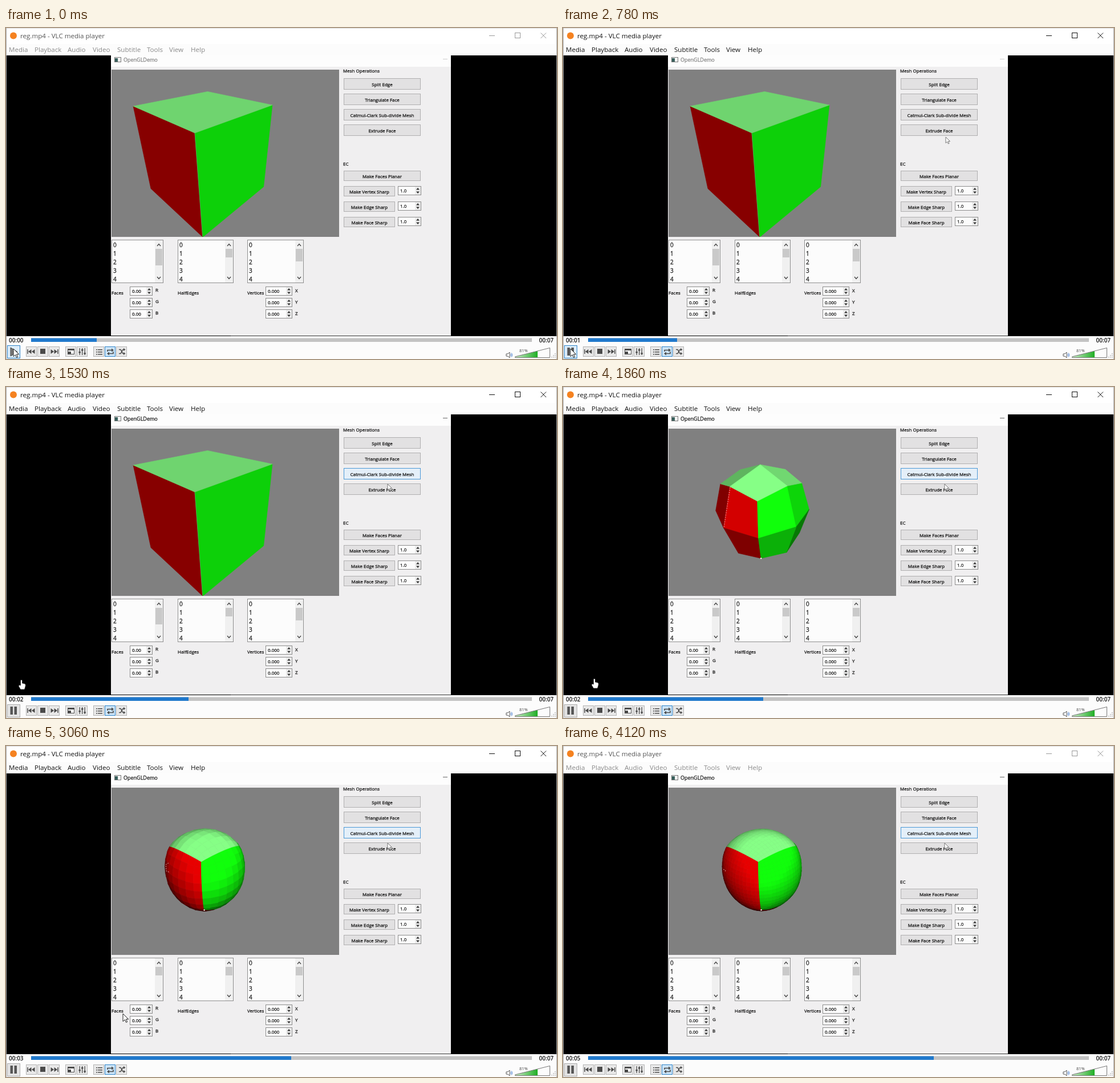
Write an HTML page with a canvas that moves like this. It is 966 by 580 pixels and loops after 4.27 s.

```html
<!DOCTYPE html>
<html lang="en">
<head>
<meta charset="utf-8">
<title>reg.mp4 - VLC media player</title>
<style>
html, body { margin: 0; width: 100%; height: 100%; overflow: hidden; background: #fff; }
canvas { display: block; width: 966px; height: 580px; }
</style>
</head>
<body>
<canvas id="stage" width="966" height="580"></canvas>
<script>
const ctx = document.getElementById('stage').getContext('2d');
const LOOP = 4270;
const SPLITS = [1680, 2280, 2970, 3730];

// ---- drawing helpers ----
function rect(x, y, w, h, fill) {
  ctx.fillStyle = fill;
  ctx.fillRect(x, y, w, h);
}

function box(x, y, w, h, fill, border) {
  rect(x, y, w, h, border);
  rect(x + 1, y + 1, w - 2, h - 2, fill);
}

function text(str, x, y, size, color = '#222', align = 'left', weight = 400) {
  ctx.font = `${weight} ${size}px "Open Sans", "Noto Sans", sans-serif`;
  ctx.textAlign = align;
  ctx.fillStyle = color;
  ctx.fillText(str, x, y);
}

// Text inside the video, slightly thickened.
function label(str, x, y, size = 8, color = '#222', align = 'left') {
  text(str, x, y, size, color, align);
  ctx.strokeStyle = color;
  ctx.lineWidth = 0.3;
  ctx.strokeText(str, x, y);
}

function trace(points, close) {
  ctx.beginPath();
  points.forEach(([x, y]) => ctx.lineTo(x, y));
  if (close) ctx.closePath();
}

function line(points, color, width = 1) {
  trace(points);
  ctx.strokeStyle = color;
  ctx.lineWidth = width;
  ctx.stroke();
}

function poly(points, fill, border, width = 1) {
  trace(points, true);
  ctx.fillStyle = fill;
  ctx.fill();
  if (!border) return;
  ctx.strokeStyle = border;
  ctx.lineWidth = width;
  ctx.stroke();
}

function disc(x, y, r, fill) {
  ctx.beginPath();
  ctx.arc(x, y, r, 0, 7);
  ctx.fillStyle = fill;
  ctx.fill();
}

// Position on a path of [time, x, y] keys.
function along(keys, t) {
  const i = keys.findIndex(k => k[0] > t);
  if (i < 0) return keys[keys.length - 1].slice(1);
  if (i === 0) return keys[0].slice(1);
  const [t0, x0, y0] = keys[i - 1], [t1, x1, y1] = keys[i];
  const u = (t - t0) / (t1 - t0), s = u * u * (3 - 2 * u);
  return [x0 + (x1 - x0) * s, y0 + (y1 - y0) * s];
}

// ---- mesh ----
const mean = pts => [0, 1, 2].map(i => pts.reduce((s, p) => s + p[i], 0) / pts.length);
const sub = (a, b) => a.map((v, i) => v - b[i]);
const cross = (a, b) => [
  a[1] * b[2] - a[2] * b[1], a[2] * b[0] - a[0] * b[2], a[0] * b[1] - a[1] * b[0]
];

const RED = [232, 0, 0], GREEN = [16, 255, 11], PALE = [134, 255, 134];

const cube = {
  verts: Array.from({ length: 8 }, (_, i) => [i & 1, i >> 1 & 1, i >> 2]),
  quads: [
    { v: [2, 0, 4, 6], base: RED }, { v: [0, 1, 5, 4], base: GREEN },
    { v: [2, 3, 1, 0], base: PALE }, { v: [1, 3, 7, 5], base: GREEN },
    { v: [3, 2, 6, 7], base: RED }, { v: [4, 5, 7, 6], base: RED }
  ]
};

// One Catmull-Clark step; three-way corners are pulled in a little less.
function subdivide({ verts, quads }) {
  const near = verts.map(() => ({ faces: [], mids: [] }));
  const edges = new Map();
  const points = verts.slice();
  const centers = quads.map(({ v }) => {
    const c = mean(v.map(i => verts[i]));
    v.forEach((a, k) => {
      const b = v[(k + 1) % 4], key = Math.min(a, b) + '_' + Math.max(a, b);
      near[a].faces.push(c);
      if (!edges.has(key)) edges.set(key, { a, b, faces: [] });
      edges.get(key).faces.push(c);
    });
    return points.push(c) - 1;
  });
  for (const e of edges.values()) {
    const ends = [verts[e.a], verts[e.b]], mid = mean(ends);
    near[e.a].mids.push(mid);
    near[e.b].mids.push(mid);
    e.id = points.push(mean([...ends, ...e.faces])) - 1;
  }
  verts.forEach((p, i) => {
    const n = near[i].faces.length, f = mean(near[i].faces), m = mean(near[i].mids);
    const pull = n === 3 ? 1.5 : 2;
    points[i] = p.map((v, k) => (f[k] + pull * m[k] + (n - 1 - pull) * v) / n);
  });
  const edge = (a, b) => edges.get(Math.min(a, b) + '_' + Math.max(a, b)).id;
  return {
    verts: points,
    quads: quads.flatMap(({ v, base }, q) => v.map((a, k) => ({
      v: [a, edge(a, v[(k + 1) % 4]), centers[q], edge(a, v[(k + 3) % 4])], base
    })))
  };
}

function project([x, y, z]) {
  const w = 1 + 0.485 * x + 0.465 * y + 0.345 * z;
  return [(331 + 362.5 * x - 4.3 * y + 133 * z) / w, (184 + 16.5 * x + 16.7 * y + 308.8 * z) / w];
}

// Front-facing quads with their flat-shaded colours.
function shade({ verts, quads }) {
  return quads.map(({ v, base }) => {
    const p = v.map(i => verts[i]);
    const n = cross(sub(p[2], p[0]), sub(p[3], p[1]));
    const lit = -(0.38 * n[0] + 0.616 * n[1] + 0.63 * n[2]) / Math.hypot(...n);
    const k = Math.min(1, 0.2 + Math.max(0, lit));
    const s = p.map(project);
    const area = (s[2][0] - s[0][0]) * (s[3][1] - s[1][1]) - (s[2][1] - s[0][1]) * (s[3][0] - s[1][0]);
    return { s, area, color: `rgb(${base.map(c => Math.round(c * k))})` };
  }).filter(q => q.area > 0);
}

const levels = [];
for (let mesh = cube, i = 0; i < 5; i++, mesh = subdivide(mesh)) {
  levels.push({ faces: shade(mesh), corner: project(mesh.verts[4]) });
}

// Dashed selection outline for each level.
const picked = [
  [],
  [[293, 176], [282, 247]],
  [[280, 206], [291, 210], [289, 243]],
  [[285, 205], [280, 208], [281, 219], [286, 221]],
  [[281, 216], [285, 218], [284, 221]]
];

function drawMesh(level) {
  const { faces, corner } = levels[level];
  ctx.save();
  ctx.beginPath();
  ctx.rect(185, 73, 399, 293);
  ctx.clip();
  rect(185, 73, 399, 293, '#808080');
  for (const q of faces) poly(q.s, q.color, q.color, 0.6);
  if (level === 0) {
    line([[331, 184], [344.5, 365]], '#5f9a55', 0.9);
  } else {
    ctx.setLineDash([2, 2]);
    line(picked[level], '#e8d8d8', 0.8);
    ctx.setLineDash([]);
    disc(...corner, 1.3, '#f4f4e8');
  }
  ctx.restore();
}

// ---- demo window inside the video ----
function button(name, x, y, w, h, state = 0) {
  const fill = ['#e2e1e2', '#e4eff9', '#cbe3f6'][state];
  box(x, y, w, h, fill, state ? '#4a98d6' : '#b0afb0');
  label(name, x + w / 2, y + h / 2 + 4, 8, '#1c1c1c', 'center');
}

function spin(value, x, y, w) {
  box(x, y, w, 16, '#fcfcfc', '#8c8c8c');
  rect(x + w - 11, y + 1, 10, 14, '#ececec');
  label(value, x + 4, y + 11);
  const cx = x + w - 6;
  poly([[cx - 3, y + 6.5], [cx, y + 3], [cx + 3, y + 6.5]], '#333');
  poly([[cx - 3, y + 9.5], [cx, y + 13], [cx + 3, y + 9.5]], '#333');
}

function list(x, w, thumb) {
  box(x, 371, w, 76, '#fcfcfc', '#8e8e8e');
  const sx = x + w - 15, cx = sx + 7;
  rect(sx, 372, 14, 74, '#f0f0f0');
  rect(sx + 1, 387, 12, thumb, '#c9c9c9');
  line([[cx - 3, 382], [cx, 378.5], [cx + 3, 382]], '#444', 1.3);
  line([[cx - 3, 436], [cx, 439.5], [cx + 3, 436]], '#444', 1.3);
  for (let i = 0; i < 5; i++) label(i, x + 3, 384 + 15 * i, 10);
}

const ops = ['Split Edge', 'Triangulate Face', 'Catmul-Clark Sub-divide Mesh', 'Extrude Face'];
const pointer = [[430, 690, 330], [720, 671, 191], [820, 671, 191], [1000, 669, 170]];

function drawDemo(t, level) {
  const active = t >= 1200;
  rect(184, 48, 596, 491, '#f0eff0');
  rect(184, 48, 596, 20, '#fdfdfd');
  box(190, 51, 12, 9, '#f4f4f4', '#777');
  rect(191, 53, 5, 6, '#39605c');
  label('OpenGLDemo', 206, 59, 9, active ? '#222' : '#8a8a8a');
  rect(766, 54, 8, 1, active ? '#666' : '#ccc');
  rect(394, 539, 386, 1, '#333');
  drawMesh(level);

  label('Mesh Operations', 591, 78);
  const pressed = SPLITS.some(s => t >= s - 80 && t < s);
  ops.forEach((name, i) => {
    const state = i === 2 && t >= 950 ? (pressed ? 2 : 1) : 0;
    button(name, 592, 88 + 27 * i, 135, 20, state);
  });
  label('EC', 591, 241);
  button('Make Faces Planar', 592, 250, 135, 18);
  ['Vertex', 'Edge', 'Face'].forEach((name, i) => {
    button(`Make ${name} Sharp`, 592, 277 + 27 * i, 90, 18);
    spin('1.0', 687, 277 + 27 * i, 41);
  });

  list(185, 91, level ? 15 : 29);
  list(301, 98, 15);
  list(423, 99, level ? 15 : 22);
  label('Faces', 185, 467);
  label('HalfEdges', 301, 467);
  label('Vertices', 423, 467);
  for (let i = 0; i < 3; i++) {
    spin('0.00', 217, 453 + 20 * i, 40);
    label('RGB'[i], 262, 462 + 20 * i);
    spin('0.000', 455, 453 + 20 * i, 47);
    label('XYZ'[i], 507, 463 + 20 * i);
  }
  if (t >= 430) arrow(...along(pointer, t), 0.66, '#777');
}

// ---- mouse pointers ----
function arrow(x, y, s, edge) {
  const shape = [[0, 0], [0, 16], [4, 12.5], [6.5, 18], [9, 17], [6.5, 11.5], [11.5, 11.5]];
  poly(shape.map(([px, py]) => [x + px * s, y + py * s]), '#fff', edge, 1);
}

function hand(x, y) {
  ctx.beginPath();
  ctx.moveTo(x - 1.5, y + 10);
  ctx.lineTo(x - 1.5, y + 1);
  ctx.quadraticCurveTo(x, y - 1, x + 1.5, y + 1);
  ctx.lineTo(x + 1.5, y + 6);
  ctx.lineTo(x + 6, y + 7);
  ctx.quadraticCurveTo(x + 8, y + 8, x + 7, y + 12);
  ctx.lineTo(x + 5.5, y + 17);
  ctx.lineTo(x - 1.5, y + 17);
  ctx.lineTo(x - 5, y + 11);
  ctx.quadraticCurveTo(x - 4, y + 8, x - 1.5, y + 10);
  ctx.fillStyle = '#fff';
  ctx.fill();
  ctx.strokeStyle = '#222';
  ctx.lineWidth = 0.8;
  ctx.stroke();
}

function resize(x, y) {
  line([[x - 4, y - 4], [x + 4, y + 4]], '#222', 1.5);
  poly([[x - 5, y - 5], [x, y - 5], [x - 5, y]], '#fff', '#222');
  poly([[x + 5, y + 5], [x, y + 5], [x + 5, y]], '#fff', '#222');
}

const mouse = [
  [1320, 13, 562], [1480, 27, 513], [1570, 27, 513], [1800, 55, 511], [2010, 55, 511],
  [2450, 205, 469], [3460, 205, 469], [3640, 958, 573], [3760, 958, 573], [3850, 985, 600]
];

function drawMouse(t) {
  if (t > 3850) return;
  const [x, y] = along(mouse, t);
  if (x > 945 && y > 560) resize(x, y);
  else if (x < 100 && y < 555) hand(x, y);
  else arrow(x, y, 0.85, '#222');
}

// ---- player ----
const INK = '#4a4a4a';
const menu = [['Media', 5], ['Playback', 50], ['Audio', 108], ['Video', 152],
  ['Subtitle', 195], ['Tools', 247], ['View', 286], ['Help', 324]];

function drawFrame(active) {
  rect(0, 0, 966, 580, '#fcfcfc');
  rect(0, 0, 966, 28, '#fff');
  rect(1, 48, 964, 492, '#000');
  rect(0, 0, 966, 1, '#ddd');
  rect(0, 0, 1, 580, '#aaa');
  rect(965, 0, 1, 580, '#aaa');
  disc(13, 13.5, 6, '#f58220');
  text('reg.mp4 - VLC media player', 25, 18, 11.6, active ? '#111' : '#555');
  menu.forEach(([name, x]) => text(name, x, 42, 11.6, active ? '#111' : '#8a8a8a'));
  const ink = active ? '#111' : '#999';
  rect(847, 13, 10, 1, ink);
  box(892, 8, 10, 10, '#fff', ink);
  line([[937.5, 8.5], [947, 18]], ink);
  line([[937.5, 18], [947, 8.5]], ink);
}

function skip(x, dir) {
  rect(x - 6.5 * dir - 0.75, 563, 1.5, 8, INK);
  for (const d of [-5.5, 0.5]) {
    const a = x + d * dir;
    poly([[a, 567], [a + 5.5 * dir, 563], [a + 5.5 * dir, 571]], INK);
  }
}

function drawIcons() {
  [36, 56, 76, 105, 125, 154, 174, 194].forEach(x => {
    const on = x === 174;
    box(x - 1, 558, 19, 18, on ? '#cce4f7' : '#e9e9e9', on ? '#2d83c8' : '#b4b4b4');
  });
  skip(44.5, 1);
  rect(60, 562, 9, 9, INK);
  skip(84.5, -1);
  box(108, 562, 12, 10, '#fff', INK);
  rect(108, 562, 12, 3, INK);
  rect(109, 567, 5, 4, INK);
  [129, 133.5, 138].forEach((x, i) => {
    rect(x - 0.5, 561, 1.3, 12, INK);
    rect(x - 1.5, [567, 563, 569][i], 3.3, 2.5, INK);
  });
  for (let y = 563; y < 573; y += 4) {
    rect(158, y, 2, 1.5, INK);
    rect(161, y, 8, 1.5, INK);
  }
  line([[178, 567], [178, 564.5], [186, 564.5]], INK, 1.6);
  line([[188, 567], [188, 570.5], [180, 570.5]], INK, 1.6);
  poly([[185, 561.5], [189, 564.5], [185, 567.5]], INK);
  poly([[181, 567.5], [177, 570.5], [181, 573.5]], INK);
  line([[198, 563.5], [201, 563.5], [205, 570.5], [207, 570.5]], INK, 1.5);
  line([[198, 570.5], [201, 570.5], [205, 563.5], [207, 563.5]], INK, 1.5);
  poly([[206, 561], [209.5, 563.5], [206, 566]], INK);
  poly([[206, 568], [209.5, 570.5], [206, 573]], INK);
}

function drawVolume() {
  poly([[877, 571], [880, 571], [883, 568], [883, 578], [880, 575], [877, 575]], '#fff', '#555');
  ctx.strokeStyle = '#4a7fd0';
  for (const r of [3, 5]) {
    ctx.beginPath();
    ctx.arc(882.5, 573, r, -0.8, 0.8);
    ctx.stroke();
  }
  const green = ctx.createLinearGradient(892, 0, 932, 0);
  green.addColorStop(0, '#cfeccb');
  green.addColorStop(1, '#1fae24');
  poly([[892, 577], [932, 577], [932, 566], [892, 576]], green);
  poly([[892.5, 577.5], [953.5, 577.5], [953.5, 560.5], [892.5, 576]], 'transparent', '#777');
  text('81%', 900, 568, 7.5, '#444');
  for (let i = 0; i < 3; i++) {
    for (let j = 0; j <= i; j++) rect(962 - 3 * j, 570 + 3 * i, 1.5, 1.5, '#aaa');
  }
}

// The bar advances in ticks of 235 ms.
function seekX(t) {
  const n = Math.floor((t - 1530) / 235);
  if (n < -5) return 159;
  return Math.round(320 + n * 30 + (n > 0 ? 1 - n * 0.1 : 0));
}

function drawControls(t) {
  const x = seekX(t), seconds = Math.floor((x - 44) / 878 * 7.4);
  text('00:0' + seconds, 5, 551, 10, '#111', 'left', 600);
  text('00:07', 934.5, 551, 10, '#111', 'left', 600);
  rect(44, 543.5, 878, 6.5, '#c3c3c3');
  rect(44, 543.5, x - 44, 6.5, '#2079cc');
  const hover = t < 1380;
  box(2, 556, 23, 23, hover ? '#dcedfa' : '#e4e4e4', hover ? '#2d83c8' : '#adadad');
  if (t < 300) {
    poly([[8, 560], [20, 567.5], [8, 575]], '#777', '#444');
  } else {
    rect(7.5, 560, 4.5, 14, '#555');
    rect(14.5, 560, 4.5, 14, '#555');
  }
  drawIcons();
  drawVolume();
}

function draw(t) {
  drawFrame(t >= 240 && t < 4020);
  drawDemo(t, SPLITS.filter(s => t >= s).length);
  drawControls(t);
  drawMouse(t);
}

const start = performance.now();
function tick() {
  draw((performance.now() - start) % LOOP);
  requestAnimationFrame(tick);
}
tick();
</script>
</body>
</html>
```
